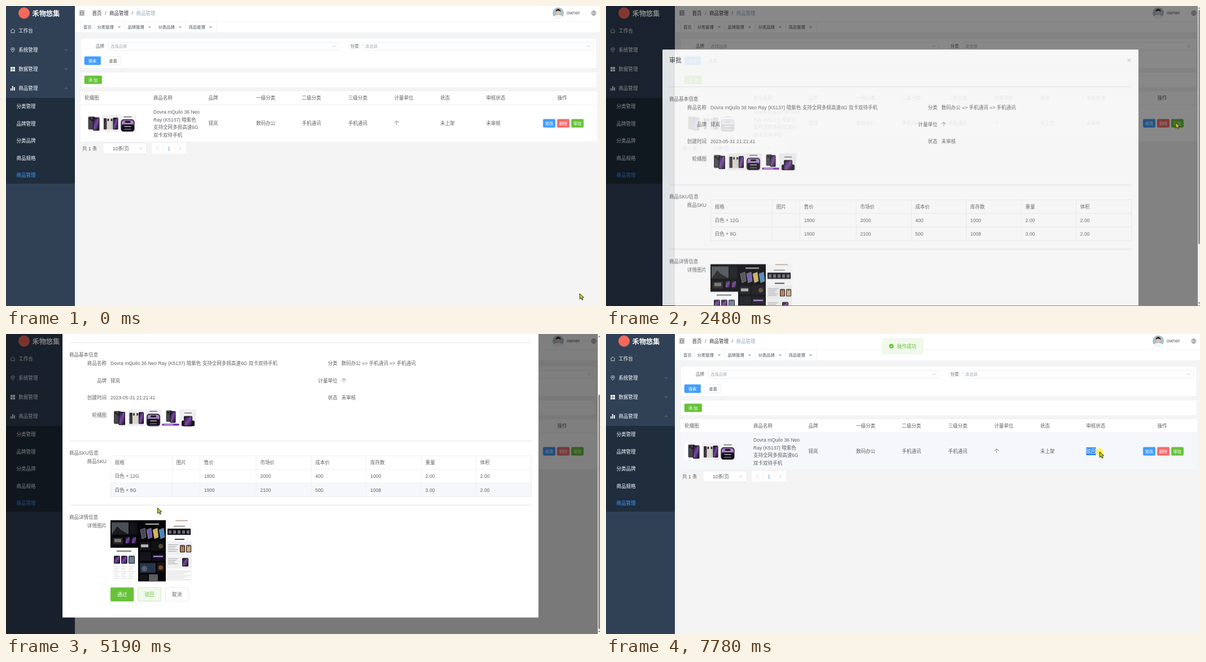
Animation, 1052 px wide and 532 px high, one loop 8 s. Source, as an HTML page:

```html
<!DOCTYPE html>
<html lang="zh">
<head>
<meta charset="utf-8">
<title>商品管理</title>
<style>
html, body { margin: 0; width: 100%; height: 100%; overflow: hidden; }
svg { display: block; width: 100vw; height: 100vh; font-family: "Liberation Sans", "Noto Sans CJK SC", "Noto Sans CJK", sans-serif; }
</style>
</head>
<body>
<svg id="stage" viewBox="0 0 1052 532"></svg>
<script>
const INK = '#606266', LINE = '#ebeef5', EDGE = '#dcdfe6', BLUE = '#409eff', GREEN = '#67c23a', RED = '#f56c6c';
const GREEN_LIGHT = '#85ce61', GREEN_DARK = '#529b2e';

// Drawing helpers: each returns SVG markup. Text is placed by its vertical centre.
const rect = (x, y, w, h, fill, extra = '') => `<rect x="${x}" y="${y}" width="${w}" height="${h}" fill="${fill}" ${extra}/>`;
const box = (x, y, w, h, fill, stroke, r = 0, extra = '') => rect(x, y, w, h, fill, `stroke="${stroke}" stroke-width=".6" rx="${r}" ${extra}`);
const circle = (x, y, r, fill, extra = '') => `<circle cx="${x}" cy="${y}" r="${r}" fill="${fill}" ${extra}/>`;
const path = (d, stroke, width = .7, fill = 'none') => `<path d="${d}" stroke="${stroke}" stroke-width="${width}" fill="${fill}"/>`;
const text = (x, y, s, fill = INK, size = 8.54, extra = '') =>
  `<text x="${x}" y="${y + size * .37}" font-size="${size}" fill="${fill}" ${extra}>${s}</text>`;
const middle = 'text-anchor="middle"';
const group = (id, body) => `<g id="${id}">${body}</g>`;
const at = (x, y, body) => `<g transform="translate(${x} ${y})">${body}</g>`;
const chevron = (x, y, color, up = 1, s = 2.4) => path(`M${x - s} ${y - up * s / 2}l${s} ${up * s}l${s} ${-up * s}`, color);
const cross = (x, y, s, color) => path(`M${x - s} ${y - s}l${2 * s} ${2 * s}m0 ${-2 * s}l${-2 * s} ${2 * s}`, color);
const button = (x, y, w, h, label, fill, stroke, color, size = 7.3, id = '') =>
  `<g ${id && `id="${id}"`}>` + box(x, y, w, h, fill, stroke, 1.6) + text(x + w / 2, y + h / 2, label, color, size, middle) + '</g>';
const lines = (x, y, w, count, gap, color) =>
  Array.from({ length: count }, (_, i) => rect(x, y + i * gap, w * (1 - i % 3 * .15), .7, color)).join('');

const phone = (x, y, w, h, screen) =>
  rect(x, y, w, h, '#121015', 'rx="1.5"') + rect(x + 1, y + 1, w - 2, h - 2, screen, 'rx="1"') + rect(x + w * .35, y + 1.5, w * .3, 1, '#111');

const pair = (x, y, w, h) =>
  rect(x, y, w * .62, h * .92, '#45434b', 'rx="2"') + circle(x + 3.5, y + 4, 1.7, '#18161c') + circle(x + 7, y + 6.5, 1.5, '#18161c') +
  phone(x + w * .42, y + h * .06, w * .58, h * .94, 'url(#violet)');

const pictures = [
  rect(0, 0, 30, 30, '#fff') + pair(6, 3, 20, 25),
  rect(0, 0, 30, 30, '#f0f0f3') + ['#3c3843', '#dfd5c0', '#c9cfc6'].map((c, i) =>
    rect(3 + i * 6, 6, 5.5, 20, c, 'rx="1"') + rect(3.7 + i * 6, 7, 2.6, 4, '#2b2830')).join('') + phone(19.5, 5, 9, 21, 'url(#violet)'),
  rect(0, 0, 30, 30, '#f2f1f4') + rect(8, 3, 14, 1.2, '#555') + rect(3, 8, 24, 22, '#17151c', 'rx="5"') +
    rect(4.4, 9.4, 21.2, 20, '#a97fc4', 'rx="4"') + rect(10, 11, 10, 3, '#111', 'rx="1.5"') +
    rect(4.4, 17, 21.2, 12, '#15111a', 'rx="2"') + rect(9, 20, 12, 1.2, '#ddd') + rect(9, 25, 12, 1.2, '#9a6fc0'),
  rect(0, 0, 30, 30, '#fff') + pair(7, 2, 17, 22) + rect(0, 25.5, 30, 3.5, '#7c2fb5') + rect(3, 26.8, 17, .9, '#fff'),
  rect(0, 0, 30, 30, '#f0eff3') + rect(9, 6, 13, 1.2, '#555') + rect(4, 20, 23, 10, '#1d1822', 'rx="2"') + phone(8, 12, 15, 18, 'url(#violet)'),
];
const gallery = (x, y, count) => pictures.slice(0, count).map((p, i) => at(x + i * 30.5, y, p)).join('');

const menu = () => {
  const icons = [
    path('M8 44l4-3.6l4 3.6M9 43.4v4h6v-4', '#fff'),
    path('M12 82c-5-5-3.5-8 0-8s5 3 0 8z', '#fff') + circle(12, 77, 1.2, 'none', 'stroke="#fff" stroke-width=".7"'),
    [8, 12.4].map(x => [108, 112.4].map(y => rect(x, y, 3.6, 3.6, '#fff')).join('')).join(''),
    rect(8, 146, 1.8, 4, '#fff') + rect(11, 142, 1.8, 8, '#fff') + rect(14, 144, 1.8, 6, '#fff'),
  ];
  return rect(0, 0, 122, 532, '#304156') + rect(0, 163, 122, 152, '#1f2d3d') + circle(32, 12.5, 10, '#f4695d') +
    text(46.5, 13, '禾物悠集', '#fff', 12.2, 'font-weight="bold"') + icons.join('') +
    ['工作台', '系统管理', '数据管理', '商品管理'].map((s, i) =>
      text(22.3, 44 + i * 34, s, '#fff') + (i ? chevron(106.5, 44 + i * 34, '#8795a8', i == 3 ? -1 : 1) : '')).join('') +
    ['分类管理', '品牌管理', '分类品牌', '商品规格', '商品管理'].map((s, i) =>
      text(18.5, 178 + i * 30.5, s, i == 4 ? BLUE : '#fff')).join('');
};

const header = () => {
  const tabs = [[132, '首页'], [156.5, '分类管理'], [210.5, '品牌管理'], [264.5, '分类品牌'], [318.5, '商品管理']];
  return rect(122, 0, 930, 47, '#fff') + path('M122 27.3H1052M122 47.3H1052', '#e4e7ed', .6) +
    path('M130 9h9M133.5 12.4h5.5M130 15.8h9', '#222', 1.1) + path('M132.4 10.6v3.6l-2.4-1.8z', 'none', 0, '#222') +
    text(152.5, 12.7, '首页', '#303133') + text(175.2, 12.7, '/') + text(183, 12.7, '商品管理', '#303133') +
    text(222.5, 12.7, '/') + text(230.5, 12.7, '商品管理', '#97a8be') +
    circle(978, 12.5, 10, '#a9c0cf') + circle(978, 10.5, 4.4, '#efbf9c') + path('M973.4 10a4.6 5 0 0 1 9.2 0q-4.6-3-9.2 0z', 'none', 0, '#3d2f2b') +
    path('M970 18.5q8-6 16 0q-8 8-16 0z', 'none', 0, '#f4f6f8') +
    text(993, 12.3, 'owner', INK) +
    circle(1041, 12.5, 4.2, 'none', `stroke="${INK}" stroke-width=".6"`) +
    path('M1036.8 12.5h8.4M1041 8.3v8.4M1037.6 10.2h6.8M1037.6 14.8h6.8M1041 8.3q-4 4.2 0 8.4q4-4.2 0-8.4', INK, .5) +
    tabs.map(([x, s], i) => path(`M${x} 27v20`, '#e4e7ed', .6) + text(x + 5, 37.2, s, '#495060', 7.3) +
      (i ? cross(x + 44, 37.2, 1.9, INK) : '')).join('') + path('M372.5 27v20', '#e4e7ed', .6);
};

const columns = [[139, '轮播图'], [261, '商品名称'], [358.5, '品牌', '铎岚'], [443, '一级分类', '数码办公'], [524, '二级分类', '手机通讯'],
  [606, '三级分类', '手机通讯'], [687.5, '计量单位', '个'], [769, '状态', '未上架'], [850.5, '审核状态'], [976.5, '操作']];

const page = () =>
  rect(0, 0, 1052, 532, '#f4f4f4') + menu() + header() +
  box(132.5, 57.5, 913.5, 53, '#fff', LINE) + box(132.5, 117.5, 913.5, 27, '#fff', LINE) +
  [[159, 181.3, '品牌', '选择品牌'], [610, 632.3, '分类', '请选择']].map(([x, left, label, hint]) =>
    text(x, 71, label, INK, 7.5) + box(left, 64.3, 408, 14, '#fff', EDGE, 2) +
    text(left + 3.8, 71.3, hint, '#a8abb2', 7.3) + chevron(left + 399.5, 71.3, '#a8abb2', 1, 3)).join('') +
  button(139, 89.7, 28.7, 14.5, '搜索', BLUE, BLUE, '#fff') + button(175.2, 89.7, 28.7, 14.5, '重置', '#fff', EDGE, INK) +
  button(139, 123.8, 30.7, 14.2, '添 加', GREEN, GREEN, '#fff') +
  rect(132, 150.5, 915, 90.5, '#fff') + rect(132, 175, 915, 66, '#f5f7fa', 'id="hoverRow"') +
  path('M132 150.5h915M132 175.2h915M132 241h915', LINE, .7) +
  columns.map(([x, title, value]) => text(x, 163, title) + (value ? text(x, 208.2, value) : '')).join('') +
  ['Dovra mQuilo 36 Neo', 'Ray (K5137) 暗紫色', '支持全网多频高速6G', '双卡双待手机'].map((s, i) => text(261, 187.5 + i * 13.9, s)).join('') +
  gallery(139.5, 193, 3) +
  rect(850.5, 201, 17, 14, '#2f86f0', 'id="selection"') + text(850.5, 208.2, '', INK, 8.54, 'id="status"') +
  button(951.3, 200.8, 21.4, 14.4, '修改', BLUE, BLUE, '#fff') + button(976.3, 200.8, 21.4, 14.4, '删除', RED, RED, '#fff') +
  button(1001.3, 200.8, 21.4, 14.4, '审批', GREEN, GREEN, '#fff', 7.3, 'review') +
  text(135, 252.5, '共 1 条') + box(171.8, 243, 77, 18.8, '#fff', EDGE, 2) + text(189, 252.5, '10条/页') + chevron(238.5, 252.5, '#a8abb2', 1, 3) +
  [258.3, 278.8, 299.2].map(x => rect(x, 242.8, 19.6, 19, '#fff')).join('') +
  path('M269.3 249.8l-2.4 2.6l2.4 2.6M307.8 249.8l2.4 2.6l-2.4 2.6', '#a8abb2') + text(288.6, 252.5, '1', BLUE, 8.54, middle);

const details = () => {
  const dark = rect(0, 0, 49, 49, '#08080a') + rect(2, 4, 30, 21, '#4a4f53') + path('M2 25l10-14l6 6l14 8z', 'none', 0, '#191b1e') +
    rect(34, 5, 13, 20, '#141418') + rect(4, 31, 18, 12, '#202226') + rect(7, 33, 12, 6, '#77716b') + phone(26, 29, 9, 13, 'url(#violet)') + phone(37, 29, 9, 13, 'url(#violet)');
  const white = rect(0, 49, 49, 60, '#fff') + rect(11, 54, 26, 1.5, '#444') +
    [6, 19, 32].map((x, i) => phone(x, 63, 11, 14, i < 2 ? 'url(#violet)' : '#6a7f9e') + lines(x, 82, 10, 8, 3, '#c9c9cc')).join('');
  const black = rect(49, 0, 49, 108.5, '#060608') + rect(62, 6, 24, 2, '#b9b9bd') +
    ['#4b4856', '#6c5aa8', '#d6b35f', '#4787c2'].map((c, i) => path(`M${53 + i * 11} 17l8-3l2 16l-7 3z`, '#aaa', .5, c)).join('') +
    [[52, 39, 18, 14, '#16171b'], [72, 37, 24, 17, '#111114'], [52, 57, 20, 15, '#14151a'], [74, 59, 22, 13, '#140f1e'],
      [52, 76, 28, 17, '#28344a'], [82, 75, 14, 16, '#1a1512'], [52, 96, 14, 10, '#131316'], [68, 96, 16, 12, '#5c5c61']].map(a => rect(...a)).join('') +
    rect(54, 43, 13, 5, '#b5b7bb') + rect(76, 63, 17, 2.4, '#a98bd6') + circle(89, 46, 4, '#5b473c') + circle(60, 86, 5, '#566070') + circle(89, 84, 4, '#784b34');
  const pale = rect(98, 0, 47, 108.5, '#fafafa') + rect(115, 0, 22, 1.5, '#bb9a86') + rect(112, 10, 20, 1.2, '#666') + rect(101, 15, 41, 11, '#0d0d10') +
    [103, 111, 119, 127, 135].map(x => rect(x, 18, 5, 6, '#6a6678')).join('') + rect(114, 33, 17, 1.8, '#333') +
    rect(100, 38, 44, 24, '#f0f0f2') + lines(102, 43, 18, 5, 3, '#88888d') + phone(123, 44, 9, 13, '#b67d56') + phone(134, 44, 9, 13, '#d0a880') +
    rect(100, 64, 44, 21, '#f0f0f2') + lines(102, 68, 17, 4, 3, '#88888d') + phone(127, 67, 11, 15, 'url(#violet)') + lines(100, 90, 43, 7, 2.5, '#d3d3d6');
  return dark + white + black + pale;
};

const skuTable = () => {
  const edges = [185.5, 294.5, 343.5, 443, 540.5, 638, 735.5, 832.5, 930.5];
  const rows = ['规格,图片,售价,市场价,成本价,库存数,重量,体积', '白色 + 12G,,1800,2000,400,1000,2.00,2.00', '白色 + 8G,,1900,2100,500,1008,3.00,2.00'];
  return [0, 1].map(i => rect(185.5, 368.5 + i * 24.2, 745, 24.2, '#f5f7fa', `id="sku${i}"`)).join('') +
    path(edges.map(x => `M${x} 344.5v72.5`).join('') + [344.5, 368.5, 392.7, 417].map(y => `M185.5 ${y}h745`).join(''), LINE, .8) +
    rows.map((row, r) => row.split(',').map((s, c) => text(edges[c] + 7.3, 356.5 + r * 24.2, s)).join('')).join('');
};

const dialog = () => {
  const end = 'text-anchor="end"';
  const field = (x, y, label, value = '') => text(x, y, label, INK, 8.54, end) + text(x + 7, y, value);
  return rect(100, 78, 843, 553.3, '#fff', 'rx="1"') + text(112, 97.3, '审批', '#303133', 11) + cross(926.5, 97, 2.8, '#909399') +
    path('M112 144h819M112 318h819M112 432h819', EDGE, .8) +
    text(112, 165.5, '商品基本信息') + text(112, 339, '商品SKU信息') + text(112, 453.5, '商品详情信息') +
    field(178, 180.7, '商品名称', 'Dovra mQuilo 36 Neo Ray (K5137) 暗紫色 支持全网多频高速6G 双卡双待手机') +
    field(178, 211, '品牌', '铎岚') + field(178, 241.3, '创建时间', '2023-05-31 21:21:41') + field(178, 272, '轮播图') +
    field(587, 180.7, '分类', '数码办公 =&gt; 手机通讯 =&gt; 手机通讯') + field(587, 211, '计量单位', '个') + field(587, 241.3, '状态', '未审核') +
    field(178, 354, '商品SKU') + field(178, 468.5, '详情图片') +
    gallery(185, 262, 5) + skuTable() + at(185, 458.7, details()) +
    button(185.3, 578.2, 40.7, 24.2, '通过', GREEN, GREEN, '#fff', 8.54) +
    button(233.7, 578.2, 40.7, 24.2, '驳回', '#f0f9eb', '#b3e19d', GREEN, 8.54, 'reject') +
    button(282.3, 578.2, 40.7, 24.2, '取消', '#fff', EDGE, INK, 8.54);
};

const scrollbar = () => rect(1048, 0, 4, 532, '#fafafa') + path('M1048.5 5.5l2-2.5l2 2.5zM1048.5 526.5l2 2.5l2-2.5z', 'none', 0, '#777') +
  rect(1049, 7.5, 5, 415.5, '#8b8b8b', 'rx="2" id="thumb"');

const toast = () => box(489.3, 8, 72.5, 27.2, '#f0f9eb', '#e1f3d8', 2) + circle(505.4, 21.4, 4, GREEN) +
  path('M503.5 21.4l1.5 1.5l2.5-2.8', '#fff', .9) + text(515.5, 21.4, '操作成功', GREEN);

const pointer = () => circle(0, 0, 6.2, '#ffee00', 'opacity=".65" id="press"') +
  path('M0 0v9.8l2.3-2l1.9 3.6l1.7-.9l-1.8-3.5l3.2-.3z', '#222', .9, '#c8cc1c');

const stage = document.getElementById('stage');
stage.innerHTML = `<defs><linearGradient id="violet" x1="0" y1="0" x2="1" y2="1">
  <stop offset="0" stop-color="#17101f"/><stop offset=".5" stop-color="#7a47a8"/><stop offset="1" stop-color="#17101f"/></linearGradient>
  <clipPath id="view"><rect width="1052" height="532"/></clipPath></defs>` +
  page() + group('mask', rect(0, 0, 1052, 532, '#000', 'opacity=".5"') +
    group('panel', `<g clip-path="url(#view)">${group('sheet', dialog())}</g>` + scrollbar())) +
  group('toast', toast()) + group('pointer', pointer());

const el = Object.fromEntries([...stage.querySelectorAll('[id]')].map(node => [node.id, node]));

// Keyframes: [time, ...values]; movement between them advances in steps of about 70 ms.
const STEP = 70, LOOP = 8000;
const pointerKeys = [[0, 1016, 510], [70, 1001, 452], [110, 989.5, 403.5], [240, 989.5, 403.5], [450, 984, 392.5], [710, 984, 392.5],
  [850, 992, 321.5], [980, 992, 321.5], [1530, 1009, 207], [2410, 1009, 207], [2790, 514, 200], [2920, 514, 200], [3200, 390, 171],
  [3480, 247.5, 186.5], [4680, 247.5, 186.5], [5190, 268.5, 308.5], [5330, 272, 385], [5530, 258, 451], [5730, 254, 460], [6510, 254, 460],
  [6600, 318.5, 406], [7250, 872, 221], [7390, 874.5, 209]];
const fadeKeys = [[2200, 0], [2270, .2], [2340, .56], [2410, .8], [2480, .93], [2550, 1], [6440, 1], [6510, .85], [6600, .55], [6670, .28], [6740, .1], [6810, 0]];
const scrollKeys = [[3740, 0], [3810, 28], [3890, 72], [3960, 99], [4030, 115], [4100, 124], [4170, 128.5]];
const toastKeys = [[6530, 0], [6600, .22], [6670, .5], [6740, .72], [6810, .86], [6880, .95], [6950, 1]];

function sample(keys, t) {
  const next = keys.findIndex(key => key[0] > t);
  if (next < 0) return keys[keys.length - 1].slice(1);
  if (next === 0) return keys[0].slice(1);
  const a = keys[next - 1], b = keys[next], span = b[0] - a[0];
  const steps = Math.max(1, Math.round(span / STEP));
  const u = Math.floor((t - a[0]) / span * steps) / steps;
  return a.slice(1).map((v, i) => v + (b[i + 1] - v) * u);
}

const during = (t, from, to) => t >= from && t < to;
const show = (node, visible) => node.setAttribute('visibility', visible ? 'inherit' : 'hidden');
const move = (node, x, y) => node.setAttribute('transform', `translate(${x} ${y})`);
function paint(node, fill, stroke, color) {
  node.firstChild.setAttribute('fill', fill);
  node.firstChild.setAttribute('stroke', stroke);
  node.lastChild.setAttribute('fill', color);
}

function render(t) {
  const [x, y] = sample(pointerKeys, t), [fade] = sample(fadeKeys, t), [scroll] = sample(scrollKeys, t), [drop] = sample(toastKeys, t);
  const hoverY = sample(pointerKeys, t - 2 * STEP)[1];
  move(el.pointer, x, y);
  show(el.press, during(t, 2050, 2200) || t >= 7650);

  show(el.mask, fade > 0);
  el.mask.setAttribute('opacity', fade);
  el.panel.setAttribute('opacity', fade);
  move(el.panel, 0, -12.2 * (1 - fade));
  move(el.sheet, 0, -scroll);
  move(el.thumb, 0, scroll * .78);
  show(el.toast, drop > 0);
  el.toast.setAttribute('opacity', Math.min(1, drop * 2));
  move(el.toast, 0, -27.5 * (1 - drop));

  show(el.hoverRow, fade < .6 && hoverY > 175 && hoverY < 241);
  [0, 1].forEach(i => show(el['sku' + i], fade === 1 && Math.floor((hoverY + scroll - 368.5) / 24.2) === i));

  const selected = t >= 7720;
  show(el.selection, selected);
  el.status.textContent = t < 6600 ? '未审核' : '驳回';
  el.status.setAttribute('fill', selected ? '#fff' : INK);

  const pressed = during(t, 2050, 2410), focused = during(t, 1460, 2050) || during(t, 6600, 7650);
  const review = pressed ? GREEN_DARK : focused ? GREEN_LIGHT : GREEN;
  paint(el.review, review, review, '#fff');
  const solid = during(t, 6250, 6320) ? GREEN_DARK : GREEN;
  if (t >= 5590) paint(el.reject, solid, solid, '#fff');
  else paint(el.reject, '#f0f9eb', '#b3e19d', GREEN);
}

function tick() {
  render(performance.now() % LOOP);
  requestAnimationFrame(tick);
}
tick();
</script>
</body>
</html>
```
